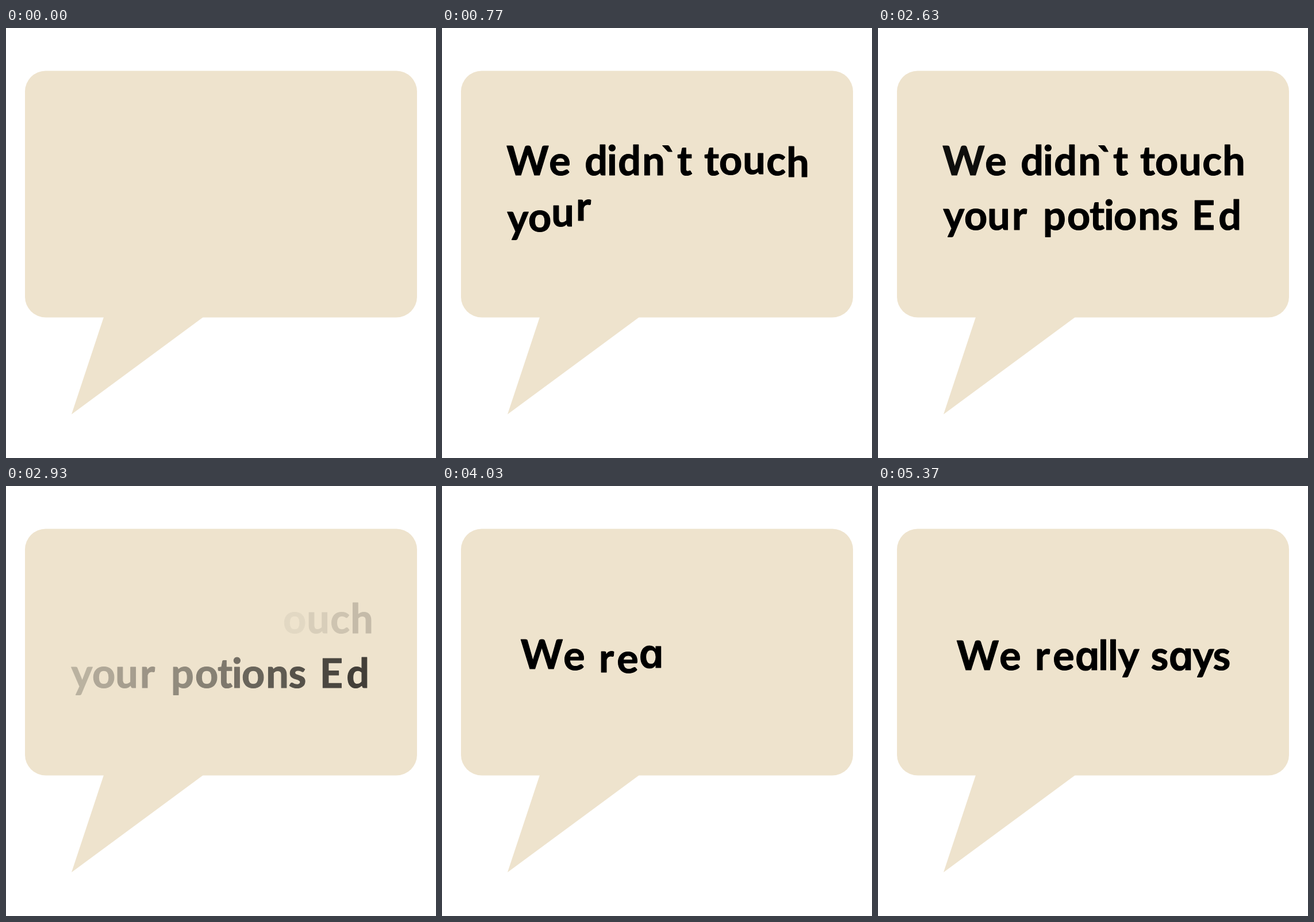
Recreate the animation shown at these times as an HTML page. Size 748x748 px, loop 7130 ms.

```html
<!DOCTYPE html>
<html lang="en">
<head>
<meta charset="utf-8">
<title>Speech bubble</title>
<style>
  html, body { margin: 0; height: 100%; overflow: hidden; background: #fff; }
  svg { display: block; width: 100vw; height: 100vh; }
  text {
    font: 700 70px Lato, sans-serif;
    text-anchor: middle;
    stroke: #000;
    stroke-width: 1.2px;
    stroke-linejoin: round;
  }
  /* single-storey a */
  .round { font: 600 68px Inter, sans-serif; font-feature-settings: "cv11"; }
</style>
</head>
<body>
<svg viewBox="0 0 748 748">
  <g fill="#eee3cd">
    <rect x="33" y="74.5" width="682" height="429" rx="36"/>
    <path d="M170 503L114 672L343 503Z"/>
  </g>
</svg>
<script>
const LOOP = 7130;
const svg = document.querySelector("svg");

// Each line: text, baseline, centre of every letter.
const scenes = [
  {
    start: 70, step: 43.5, slow: 1, fade: 2615,
    lines: [
      ["We didn`t touch", 256,
        [149, 205, 268, 296, 326, 368, 395, 422, 469, 502, 543, 581, 619]],
      ["your potions Ed", 351,
        [132, 170, 210, 246, 307, 349, 381, 402, 430, 472, 507, 566, 612]]
    ]
  },
  {
    start: 3662, step: 74, slow: 1.33, fade: Infinity,
    lines: [
      ["We really says", 320,
        [173.5, 230, 286, 323, 364, 392, 409, 436, 490, 527, 566, 598]]
    ]
  }
];

function addLetter(char, x, y) {
  const node = document.createElementNS("http://www.w3.org/2000/svg", "text");
  node.textContent = char;
  node.setAttribute("x", x);
  node.setAttribute("y", y);
  if (char === "a") node.setAttribute("class", "round");
  svg.append(node);
  return node;
}

for (const scene of scenes) {
  scene.letters = scene.lines.flatMap(([words, y, xs]) =>
    [...words.replaceAll(" ", "")].map((char, i) => addLetter(char, xs[i], y)));
}

// Damped spring: drops in from above, overshoots and settles.
const bounce = ms => -17 * Math.exp(-0.0085 * ms) * Math.cos(Math.PI * ms / 145);

function draw(t) {
  for (const { start, step, slow, fade, letters } of scenes) {
    letters.forEach((node, i) => {
      const age = t - start - i * step;
      const gone = Math.min(1, Math.max(0, (t - fade - i * 10) / 235));
      node.setAttribute("opacity", age < 0 ? 0 : 1 - gone);
      node.setAttribute("transform", `translate(0 ${bounce(Math.max(0, age) / slow).toFixed(2)})`);
    });
  }
}

let origin;
function tick(now) {
  origin ??= now;
  draw((now - origin) % LOOP);
  requestAnimationFrame(tick);
}
draw(0);
requestAnimationFrame(tick);
</script>
</body>
</html>
```
